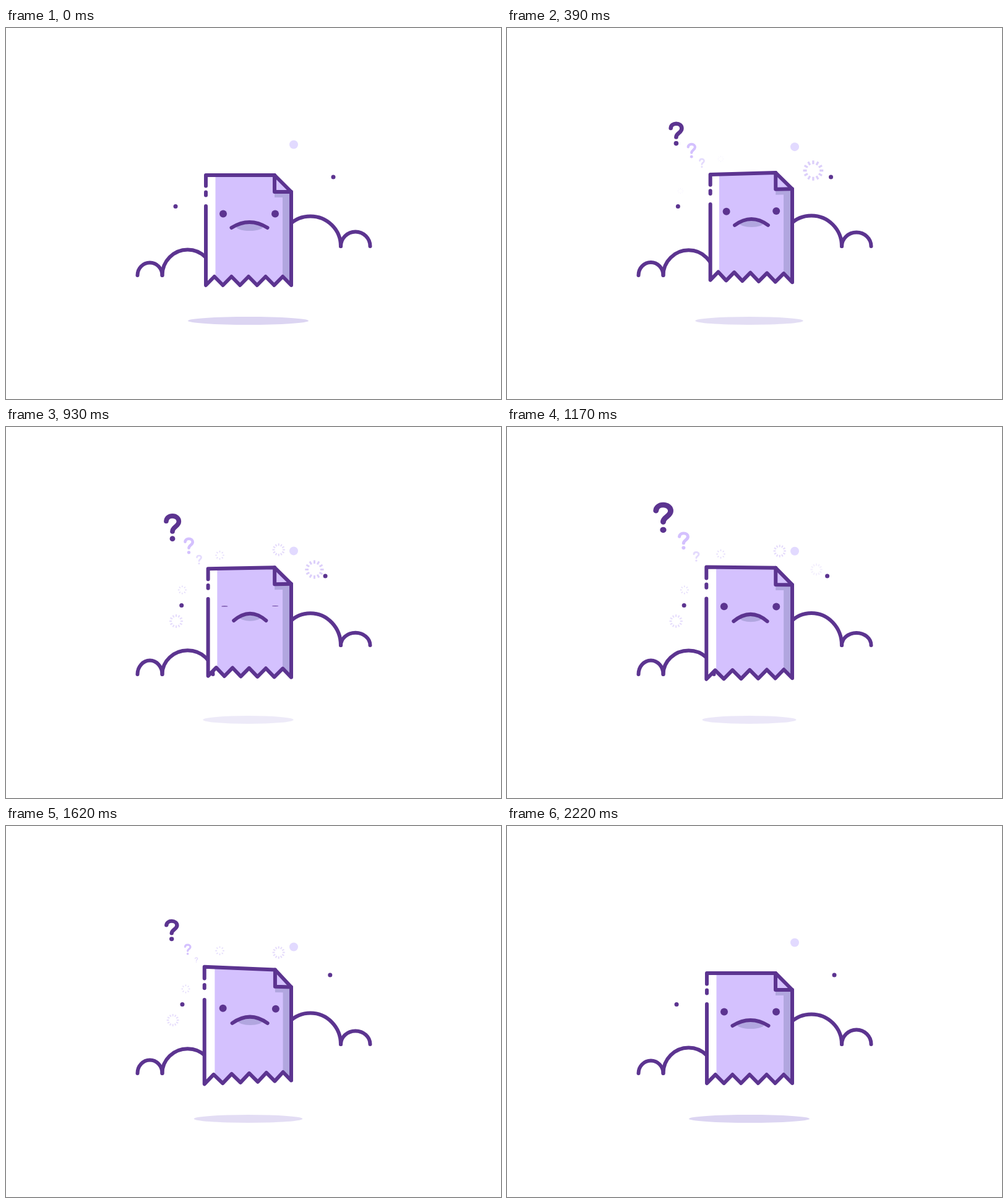
Animation, 800 px wide and 600 px high, one loop 2250 ms. Source, as an HTML page with a canvas:

```html
<!DOCTYPE html>
<html lang="en">
<head>
<meta charset="utf-8">
<title>Puzzled page</title>
<style>
  html, body { margin: 0; width: 100%; height: 100%; overflow: hidden; background: #fff; }
  canvas { display: block; }
</style>
</head>
<body>
<canvas id="stage" width="800" height="600"></canvas>
<script>
const ctx = document.getElementById('stage').getContext('2d');
const LOOP = 2250;
const INK = '#5c3490', LILAC = '#d4c1fe', SHADE = '#b1a6df', PALE = '#e2daff';

const mix = (a, b, u) => a + (b - a) * u;
const ease = u => (1 - Math.cos(Math.PI * u)) / 2;

// Eased value(s) at time t; each key is [time, value, ...].
function pose(t, keys) {
  const next = keys.findIndex(key => key[0] > t);
  if (next === 0) return keys[0].slice(1);
  if (next < 0) return keys[keys.length - 1].slice(1);
  const a = keys[next - 1], b = keys[next];
  const u = ease((t - a[0]) / (b[0] - a[0]));
  return a.slice(1).map((v, i) => mix(v, b[i + 1], u));
}
const track = (t, ...keys) => pose(t, keys)[0];
const swell = (t, peak, end = LOOP) => track(t, [0, 0], [peak, 1], [end, 0]);
const visible = (t, from, until, gone) => track(t, [from, 0], [from + 150, 1], [until, 1], [gone, 0]);

function ellipse(x, y, rx, ry, color) {
  ctx.fillStyle = color;
  ctx.beginPath();
  ctx.ellipse(x, y, rx, ry, 0, 0, Math.PI * 2);
  ctx.fill();
}
const dot = (x, y, r, color) => ellipse(x, y, r, r, color);

function strokeWith(color, width) {
  ctx.strokeStyle = color;
  ctx.lineWidth = width;
  ctx.stroke();
}

function hump(x, y, rx, ry) {
  ctx.beginPath();
  ctx.ellipse(x, y, rx, ry, 0, Math.PI, Math.PI * 2);
  strokeWith(INK, 6);
}

function clouds(breath) {
  hump(232.5, 400, 20, 20.5 + 2 * breath);
  hump(293.5, 400, 41, 41.5 - 3 * breath);
  hump(492, 353, 49, 48.5 + 3.5 * breath);
  hump(564.8, 353, 23.7, 23.5 - 3.5 * breath);
}

function spinner(x, y, r, count, color, show) {
  if (!show) return;
  ctx.save();
  ctx.globalAlpha = show;
  ctx.translate(x, y);
  ctx.scale(0.5 + show / 2, 0.5 + show / 2);
  ctx.lineCap = 'butt';
  ctx.beginPath();
  for (let i = 0; i < count; i++) {
    const a = i / count * Math.PI * 2;
    const c = Math.cos(a) * r, s = Math.sin(a) * r;
    ctx.moveTo(c * 0.63, s * 0.63);
    ctx.lineTo(c, s);
  }
  strokeWith(color, r * 0.2);
  ctx.restore();
}

function spinners(t) {
  const drift = t / 1000;
  spinner(492.3 + 6.6 * drift, 230.5, 17.3 - 2.4 * drift, 12, '#dccffa', visible(t, 60, 1050, 1250));
  spinner(345.5, 215 - 8.2 * drift, 7.3, 8, '#e2d9fb', visible(t, 330, 1860, 2100));
  spinner(277.2 + 8.2 * drift, 263.5, 7, 8, '#e2d9fb', visible(t, 330, 1620, 1890));
  spinner(282.3 - 7.8 * drift, 314, 12.3 - 1.4 * drift, 12, '#e6ddfc', visible(t, 630, 1600, 1800));
  spinner(440.7, 190.3 + 8.8 * drift, 10.2, 12, '#e4dafb', visible(t, 630, 1600, 1800));
}

// Poses are [x, y, height]: rise, first stop, drift, second stop, return.
const marks = [
  { color: '#e4dbfd', grown: 330, gone: 1800,
    poses: [[300, 235, 0], [315, 218.5, 15.5], [312, 214.5, 15.5], [303, 207, 17], [312, 226, 0]] },
  { color: LILAC, grown: 450, gone: 1860,
    poses: [[312.5, 233.5, 0], [297.5, 196.5, 26], [295.5, 192, 27], [280.5, 180, 29.5], [314, 230, 0]] },
  { color: INK, grown: 480, gone: 1920,
    poses: [[321, 244, 0], [268.5, 163.5, 43], [269, 162.7, 45], [244.5, 139, 51.5], [319, 234, 0]] }
];

function questionMark(t, { color, grown, gone, poses: [start, first, drifted, second, end] }) {
  const [x, y, height] = pose(t, [[30, ...start], [grown, ...first], [950, ...drifted],
    [1310, ...second], [1440, ...second], [gone, ...end]]);
  if (height < 0.5) return;
  const size = height / 43;
  const stretch = track(t, [950, 1], [1310, 1.09], [1440, 1.09], [gone, 1]);
  ctx.save();
  ctx.translate(x, y);
  ctx.scale(size * stretch, size);
  ctx.beginPath();
  ctx.moveTo(-9.6, -10);
  ctx.bezierCurveTo(-9.2, -15, -5, -18, 0, -18);
  ctx.bezierCurveTo(5.5, -18, 9.9, -14.5, 9.9, -9.5);
  ctx.bezierCurveTo(9.9, -2, 0, -1, 0, 6);
  strokeWith(color, 7.3);
  dot(0, 17.2, 4.2, color);
  ctx.restore();
}

function page(t, float) {
  const turn = track(t, [0, 0], [600, -0.056], [1600, 0.065], [LOOP, 0]);
  const squeeze = 1 - 0.7 * Math.max(0, turn);
  const depth = 1 - 1 / (1 + turn);
  const midY = 327 - 11.2 * float;

  // Perspective swing around the right edge; d is the distance from that edge.
  const place = (d, y) => {
    const k = 1 / (1 - depth * d / 138);
    return [461 - d * squeeze * k, midY + y * k];
  };
  const path = points => {
    ctx.beginPath();
    points.forEach(([d, y]) => ctx.lineTo(...place(d, y)));
  };
  const fill = (points, color) => {
    path(points);
    ctx.fillStyle = color;
    ctx.fill();
  };
  const line = points => {
    path(points);
    strokeWith(INK, 6);
  };

  const teeth = Array.from({ length: 11 }, (_, i) => [i * 13.8, i % 2 ? 75 : 89]);
  const outline = [[138, -89], [27, -89], [0, -62], ...teeth];

  fill(outline, '#fff');
  ctx.save();
  path(outline);
  ctx.clip();
  fill([[122.5, -89], [0, -89], [0, 89], [122.5, 89]], LILAC);
  fill([[27, -62], [0, -62], [0, 89], [14, 89], [14, -53], [27, -53]], SHADE);
  ctx.restore();

  fill([[27, -89], [27, -62], [0, -62]], LILAC);
  line([[27, -89], [27, -62], [0, -62]]);
  line([[138, -71.5], ...outline, [138, -39]]);
  line([[138, -61.5], [138, -56.5]]);

  const blink = track(t, [840, 1], [930, 0.1], [1020, 1]);
  for (const d of [110, 26]) {
    const [x, y] = place(d, -26.5);
    ellipse(x, y, mix(5.2, 6, blink), 6 * blink, INK);
  }

  ellipse(...place(67.3, -7 - 0.8 * float), 23 - 7 * float, 8 - 2.5 * float, SHADE);
  ctx.beginPath();
  ctx.moveTo(...place(96.5 - 2 * float, -4 + 1.2 * float));
  ctx.quadraticCurveTo(...place(67.5, -22 - 3.8 * float), ...place(38.5 + 2.5 * float, -4 + 1.2 * float));
  strokeWith(INK, 6);
}

function draw(t) {
  const float = swell(t, 870, 2200);
  const breath = swell(t, 1080);

  ctx.fillStyle = '#fff';
  ctx.fillRect(0, 0, 800, 600);
  ctx.lineCap = ctx.lineJoin = 'round';

  ctx.globalAlpha = 1 - 0.5 * float;
  ellipse(391.5, 473.5, 97.5 - 24.5 * float, 6.5, '#dcd5f2');
  ctx.globalAlpha = 1;

  clouds(breath);
  spinners(t);
  dot(274 + 13 * swell(t, 1400), 288.5, 3.5, INK);
  dot(529 - 13 * float, 241, 3.5, INK);
  dot(465, 188.5 + 12.5 * breath, 7, PALE);
  marks.forEach(mark => questionMark(t, mark));
  page(t, float);
}

function tick() {
  draw(performance.now() % LOOP);
  requestAnimationFrame(tick);
}
tick();
</script>
</body>
</html>
```
